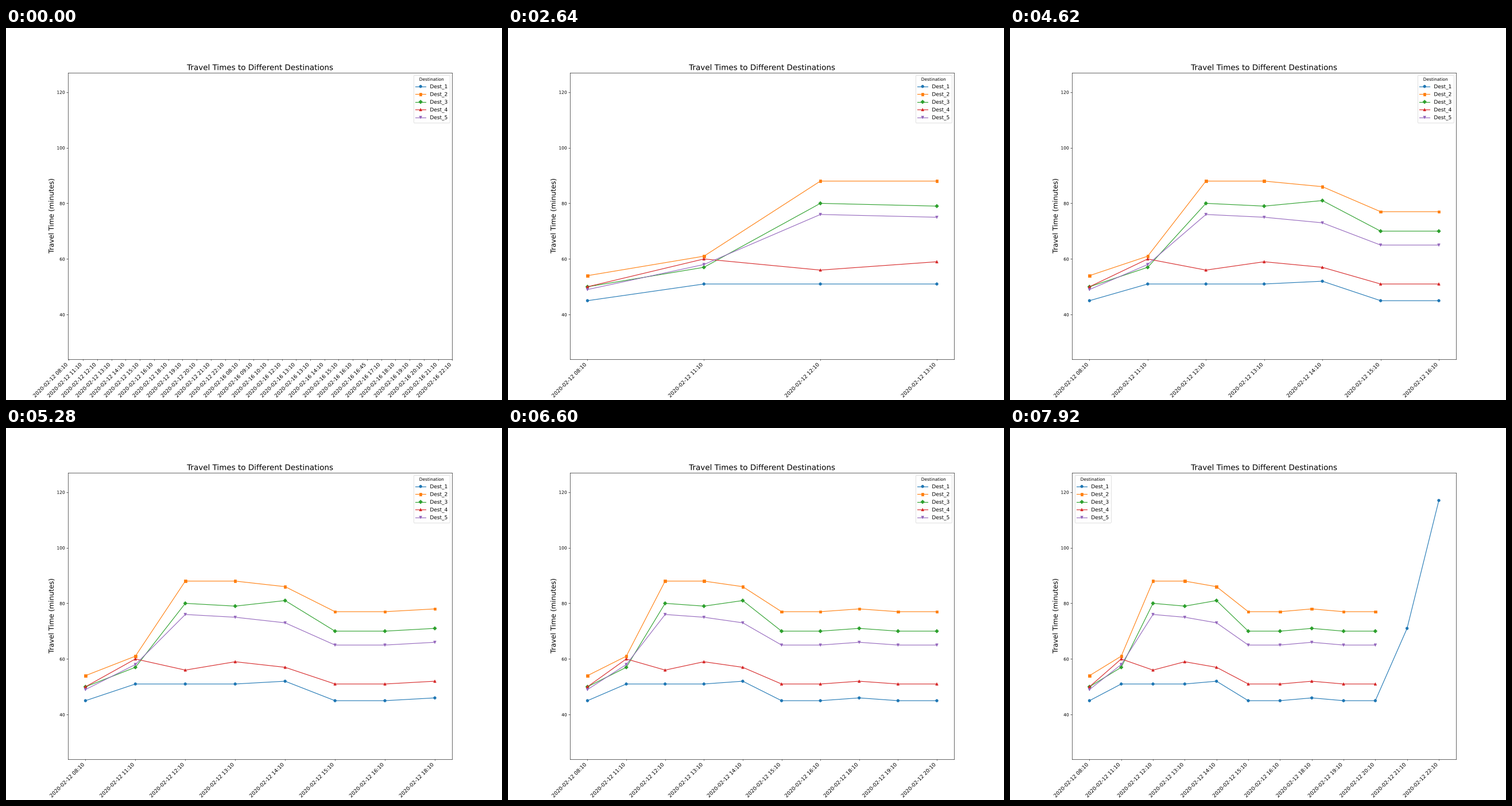
A matplotlib script that plays this animation: 864 by 648 pixels, repeating every 8000 ms.

```python
import matplotlib.pyplot as plt
import numpy as np
from matplotlib.animation import FuncAnimation
from matplotlib.patheffects import Normal

INTERVAL = 40      # ms per drawn frame
FRAMES = 200
STEP = 660         # ms until the next reading appears
FULL_READINGS = 10  # readings every destination has
BUMP = 7           # the 18:10 reading is a minute slower

# Morning, rush and evening level in minutes; the evening level then holds.
KEY_TIMES = {
    "tab:blue": (45, 51, 51, 51, 52, 45),
    "tab:orange": (54, 61, 88, 88, 86, 77),
    "tab:green": (50, 57, 80, 79, 81, 70),
    "tab:red": (50, 60, 56, 59, 57, 51),
    "tab:purple": (49, 58, 76, 75, 73, 65),
}
MARKERS = "osD^v"


def travel_times(keys):
    index = np.arange(FULL_READINGS)
    return np.interp(index, range(len(keys)), keys) + (index == BUMP)


def day_labels(date, skipped, extra=()):
    times = [f"{hour:02}:10" for hour in range(8, 23) if hour not in skipped]
    return [f"{date} {time}" for time in sorted([*times, *extra])]


LABELS = (day_labels("2020-02-12", (9, 10, 17))
          + day_labels("2020-02-16", (11,), ("13:10", "16:45")))
SERIES = [travel_times(keys) for keys in KEY_TIMES.values()]
SERIES[0] = np.append(SERIES[0], (71, 117))

# Unhinted outlines keep small text and markers at sub-pixel positions.
plt.rcParams.update({"font.family": "DejaVu Sans", "text.hinting": "none",
                     "path.effects": [Normal()]})

fig, ax = plt.subplots(figsize=(16, 12), dpi=54)
fig.subplots_adjust(right=0.8998)
lines = [ax.plot([], [], color=color, marker=marker, label=f"Dest_{i}")[0]
         for i, (color, marker) in enumerate(zip(KEY_TIMES, MARKERS), 1)]
ax.set_title("Travel Times to Different Destinations", fontsize=18)
ax.set_ylabel("Travel Time (minutes)", fontsize=16)
ax.set_ylim(24, 127)
ax.set_yticks(range(40, 121, 20))


def x_limits(count):
    if count == 0:
        return -0.055, len(LABELS) - 1
    margin = 0.05 * (count - 1) or 0.055
    return -margin, count - 1 + margin


def show_readings(count):
    for line, values in zip(lines, SERIES):
        shown = values[:count]
        line.set_data(range(len(shown)), shown)
    labels = LABELS[:count] or LABELS
    ax.set_xticks(range(len(labels)), labels, rotation=45, ha="right", fontsize=12)
    ax.set_xlim(*x_limits(count))
    # The legend moves away once the last reading reaches its corner.
    corner = "upper left" if count >= len(SERIES[0]) else "upper right"
    ax.legend(title="Destination", fontsize=12, title_fontsize=10, loc=corner)


shown_count = None


def update(frame):
    global shown_count
    count = (frame * INTERVAL + INTERVAL // 2) // STEP
    if count != shown_count:
        show_readings(count)
        shown_count = count
    return lines


anim = FuncAnimation(fig, update, frames=FRAMES, interval=INTERVAL,
                     init_func=lambda: update(0), repeat=True, repeat_delay=0, blit=False)
plt.show()
```
